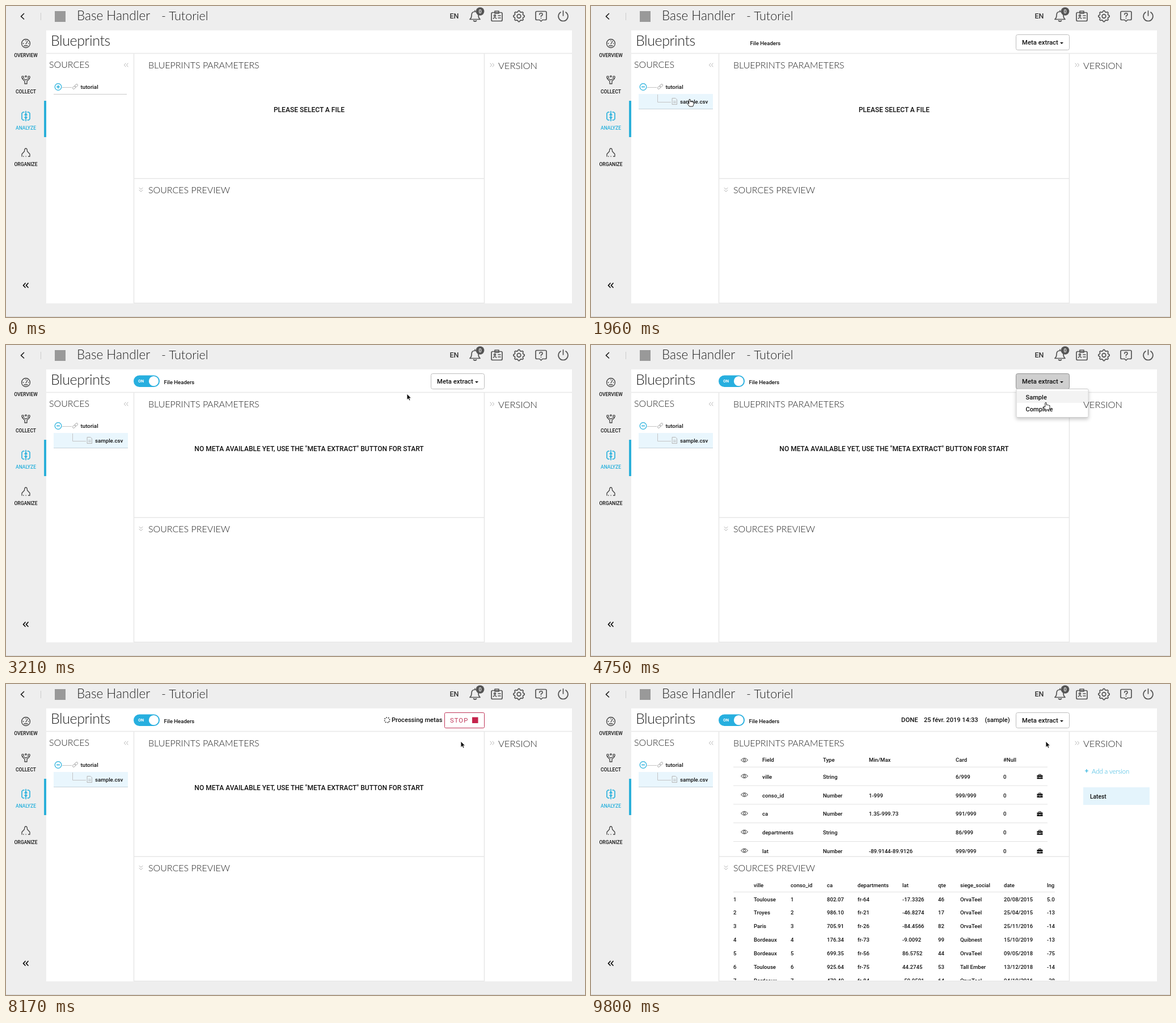
These frames come from a looping animation (1021x548 px, 9920 ms). An HTML page:

```html
<!DOCTYPE html>
<html lang="en">
<head>
<meta charset="utf-8">
<title>Blueprints</title>
<style>
html, body { margin: 0; width: 100%; height: 100%; overflow: hidden; background: #eee; }
svg { display: block; width: 1021px; height: 548px; }
text { font-family: Roboto, Arial, sans-serif; font-weight: 500; font-size: 9.6px; fill: #111; white-space: pre; }
.thin { font-family: Lato, "Open Sans", sans-serif; font-weight: 300; font-size: 16px; fill: #222; }
.line { fill: none; stroke: #555; stroke-width: 1.7; stroke-linecap: round; stroke-linejoin: round; }
.side { stroke: #444; stroke-width: 1.3; }
.soft { stroke: #b5b5b5; stroke-width: 1; }
.rule { stroke: #e2e2e2; }
.blue { stroke: #23afdc; }
</style>
</head>
<body>
<svg viewBox="0 0 1021 548">
  <defs>
    <clipPath id="paramClip"><rect x="227" y="85" width="615" height="218"/></clipPath>
    <clipPath id="previewClip"><rect x="227" y="305" width="591" height="217"/></clipPath>
    <filter id="shadow" x="-10%" y="-10%" width="120%" height="140%">
      <feDropShadow dx="0" dy="3" stdDeviation="3" flood-opacity=".22"/>
    </filter>
    <g id="eye" fill="none" stroke="#333">
      <path d="M-6 0Q0-7 6 0Q0 7-6 0Z"/><circle r="2"/>
    </g>
    <g id="case" fill="#111">
      <path d="M-5-2.5H5V.5H-5ZM-5 1.2H-1V2H1V1.2H5V4H-5Z"/>
      <path d="M-2-2.5V-4H2V-2.5" fill="none" stroke="#111"/>
    </g>
  </defs>
  <rect width="1021" height="548" fill="#eee"/>
  <path d="M0 547.5H1021" stroke="#d4d4d4"/>
  <rect x="71" y="43" width="927" height="481" fill="#fff"/>
  <path d="M71 83.5H998M225.5 84V524M843.5 84V524M226 304H843M226 523.5H843" fill="none" stroke="#e8e8e8" stroke-width="1.6"/>

  <!-- top bar -->
  <path class="line" d="M31.5 13.5L26.5 18.3L31.5 23" style="stroke:#222"/>
  <path d="M61.5 12V25" stroke="#ccc"/>
  <rect x="86" y="9" width="19" height="19" fill="#999"/>
  <g class="line">
    <path d="M818 23.5Q821 21 821 16Q821 10 827 10Q833 10 833 16Q833 21 836 23.5ZM827 10V8M824.5 26Q827 28 829.5 26"/>
    <rect x="856" y="11.5" width="19" height="15" rx="2"/>
    <path d="M862 11V9H869V13H862ZM868 17H872M868 21H872"/>
    <circle cx="862" cy="17" r="1.5"/><path d="M859.5 22Q862 18.5 864.5 22"/>
    <path id="gear"/><circle cx="904.5" cy="18" r="3.3"/>
    <path d="M936 9.5H951Q953 9.5 953 11.5V22.5Q953 24.5 951 24.5H946L943.5 27L941 24.5H936Q934 24.5 934 22.5V11.5Q934 9.5 936 9.5Z"/>
    <path d="M940.8 15Q941 12.5 943.5 12.5Q946 12.5 946 15Q946 16.5 943.5 17.8V18.5M943.5 21.3V21.4"/>
    <path d="M978 11A8.4 8.4 0 1 0 987 11M982.5 8.5V17"/>
  </g>
  <circle cx="836" cy="9.5" r="7.3" fill="#555"/>

  <!-- side bar -->
  <g class="line side">
    <circle cx="35" cy="66" r="7.5"/><path d="M35 67L38 62M30 66H31M35 61V61.5M39.5 66H40M32 70H38"/>
    <circle cx="29.5" cy="125.5" r="1.8"/><circle cx="35" cy="124" r="1.2"/><circle cx="40.5" cy="125.5" r="1.8"/>
    <path d="M28.5 128L33 132.5V137H37V132.5L41.5 128M32 128.5L35 130.5L38 128.5"/>
    <path d="M32.5 256Q32.5 251 35 251Q37.5 251 37.5 256L42 261V265H39.5M28 265V261L32.5 256M30.5 265H31M35 265H35.2"/>
  </g>
  <g class="line side blue" style="stroke-width:1.6">
    <path d="M32 187H30L28 189V199L30 201H32M38 187H40L42 189V199L40 201H38M35 185.5V202.5" stroke-dasharray="30"/>
    <path d="M33 192L35 190L37 192M33 196L35 198L37 196"/>
  </g>
  <rect x="67" y="167" width="4" height="64" fill="#2bb0da"/>
  <path class="line" d="M34 488.5L30.5 492.3L34 496M39 488.5L35.5 492.3L39 496" style="stroke:#111"/>
  <g class="line soft">
    <path d="M211 101L208.5 104L211 107M215 101L212.5 104L215 107M854 101L856.5 104L854 107M858 101L860.5 104L858 107M235 320.5L238 323L241 320.5M235 324.5L238 327L241 324.5"/>
  </g>

  <!-- source tree -->
  <path d="M99 143.5H116" stroke="#c4c4c4"/>
  <g class="line soft" transform="translate(122 142) rotate(-42)">
    <rect x="-5.5" y="-1.8" width="6" height="3.6" rx="1.8"/><rect x="-.5" y="-1.8" width="6" height="3.6" rx="1.8"/>
  </g>
  <circle cx="92" cy="142.5" r="5.8" fill="#fff" stroke="#23afdc" stroke-width="1.2"/>
  <path d="M89 142.5H95" stroke="#23afdc" stroke-width="1.5"/>
  <path id="closed" d="M92 139.5V145.5" stroke="#23afdc" stroke-width="1.5"/>
  <path id="closedRule" d="M84 155.5H213" stroke="#c9c9c9"/>
  <g id="branch">
    <rect id="rowTint" x="84" y="155" width="131" height="26" fill="#e9f6fd"/>
    <path d="M84 181.5H215" stroke="#c6d3da"/>
    <path d="M117.5 156V169.5H141" fill="none" stroke="#c4c4c4"/>
    <path class="line soft" d="M143.5 162.5H149L151.5 165V173.5H143.5ZM145.5 168H149.5M145.5 170.5H149.5"/>
  </g>

  <g id="toggle">
    <rect x="225" y="53.5" width="46" height="20.5" rx="10.2" fill="#27afdf"/>
    <circle cx="260.5" cy="63.7" r="8.6" fill="#fff"/>
  </g>
  <g id="metaButton">
    <rect id="metaBox" x="749.5" y="50.5" width="94" height="27" rx="3"/>
    <path d="M827 64H833L830 67Z" fill="#111"/>
  </g>
  <g id="menu">
    <rect x="750" y="77.5" width="127" height="50" rx="2" fill="#fff" stroke="#ccc" filter="url(#shadow)"/>
    <rect id="menuTint" x="751" y="81" width="125" height="21" fill="#f3f3f3"/>
  </g>
  <g id="busy">
    <circle id="spinner" cx="672" cy="63.5" r="4.5" fill="none" stroke="#333" stroke-width="1.7" stroke-dasharray="1.8 1.734"/>
    <rect x="773.5" y="50.5" width="70" height="27" rx="2" fill="#fff" stroke="#bf3558"/>
    <rect x="822" y="58.5" width="10.5" height="10.5" fill="#c5234b"/>
  </g>
  <g id="done">
    <rect x="868" y="182" width="117" height="31" fill="#e4f4fc"/>
    <path d="M871 153H877M874 150V156" stroke="#23afdc" stroke-width="1.2"/>
    <g id="params" clip-path="url(#paramClip)"></g>
    <g id="preview" clip-path="url(#previewClip)"></g>
  </g>
  <g id="base"></g>
  <g id="cursor">
    <path id="arrow" d="M0 0V10.6L2.5 8.4L4.1 12L6 11.2L4.4 7.7H7.6Z" fill="#111" stroke="#fff" stroke-width=".8"/>
    <path id="hand" d="M-1.2 1Q0-.6 1.2 1V5L2.2 4.2L3.4 5L4.6 4.6L5.6 5.6L7 5.5V9.5L5.6 13H-.4L-4 8.2Q-3.6 6.6-2 7.6L-1.2 8.2Z" fill="#fff" stroke="#222" stroke-linejoin="round"/>
  </g>
</svg>
<script>
const LOOP = 9920;
const NS = "http://www.w3.org/2000/svg";
const $ = id => document.getElementById(id);

function add(parent, tag, attrs) {
  const el = document.createElementNS(NS, tag);
  for (const key in attrs) el.setAttribute(key, attrs[key]);
  return $(parent).appendChild(el);
}
function label(parent, x, y, text, style = "", cls = "") {
  const el = add(parent, "text", { x, y, style, class: cls });
  el.textContent = text;
  return el;
}
const size = px => `font-size:${px}px`;
const middle = px => size(px) + ";text-anchor:middle";

// gear outline: eight rounded teeth
let gear = "";
for (let i = 0; i < 32; i++) {
  const r = i % 4 < 2 ? 9.7 : 7.8, a = (i - .5) * Math.PI / 16;
  gear += `${i ? "L" : "M"}${904.5 + r * Math.cos(a)} ${18 + r * Math.sin(a)}`;
}
$("gear").setAttribute("d", gear + "Z");

// fixed labels
label("base", 125, 25, "Base Handler", size(22.5), "thin");
label("base", 274, 25, "- Tutoriel", size(21.5), "thin");
label("base", 79, 70, "Blueprints", size(25) + ";letter-spacing:-.4px", "thin");
label("base", 76, 109, "SOURCES", "", "thin");
label("base", 251, 109.5, "BLUEPRINTS PARAMETERS", "", "thin");
label("base", 251, 330, "SOURCES PREVIEW", "", "thin");
label("base", 868, 110.5, "VERSION", size(16.5), "thin");
label("base", 782.5, 22, "EN", size(12.5) + ";fill:#333");
label("base", 836, 13, "0", middle(9) + ";fill:#fff");
["OVERVIEW", "COLLECT", "ANALYZE", "ORGANIZE"].forEach((name, i) =>
  label("base", 35, 90 + 64 * i, name, middle(8.5) + (i === 2 ? ";fill:#23afdc" : "")));
label("base", 131.5, 146, "tutorial", size(9.8));

label("branch", 157, 171.5, "sample.csv", size(9.7));
label("toggle", 233, 66.3, "ON", size(7.3) + ";fill:#fff;font-weight:700");
label("metaButton", 760, 68, "Meta extract", size(11.3));
label("menu", 766.5, 95.5, "Sample", size(11.1));
label("menu", 766.5, 116.5, "Complete", size(11.1));
label("busy", 680, 67, "Processing metas", size(11.1));
label("busy", 783, 68, "STOP", size(11.2) + ";font-weight:400;letter-spacing:1.1px;fill:#bf3558");
const headers = label("base", 278, 68.5, "File Headers");
const pick = label("base", 534.5, 187, "PLEASE SELECT A FILE", middle(12));
const noMeta = label("base", 534.5, 187, 'NO META AVAILABLE YET, USE THE "META EXTRACT" BUTTON FOR START', middle(12));

// results
label("done", 547, 67, "DONE", size(11.3));
label("done", 587, 67, "25 févr. 2019 14:33", size(11.1));
label("done", 694.5, 67, "(sample)", size(11.1));
label("done", 883, 158, "Add a version", size(11.3) + ";fill:#23afdc", "thin");
label("done", 880, 201.5, "Latest", size(10.2));

function row(parent, xs, y, cells) {
  cells.split("|").forEach((cell, i) => label(parent, xs[i], y, cell));
}
const paramX = [302, 409, 490, 643, 727];
row("params", paramX, 137, "Field|Type|Min/Max|Card|#Null");
add("params", "use", { href: "#eye", x: 270.5, y: 134 });
[
  "ville|String||6/999|0",
  "conso_id|Number|1-999|999/999|0",
  "ca|Number|1.35-999.73|991/999|0",
  "departments|String||86/999|0",
  "lat|Number|-89.9144-89.9126|999/999|0"
].forEach((cells, i) => {
  const y = 163.3 + 32.8 * i;
  add("params", "path", { d: `M251 ${y - 17}H805`, class: "rule" });
  add("params", "use", { href: "#eye", x: 270.5, y: y - 1 });
  add("params", "use", { href: "#case", x: 791.5, y });
  row("params", paramX, y + 3.5, cells);
});

const previewX = [251, 287, 352, 416, 470, 549, 612, 651, 728, 804];
row("preview", previewX, 358, "|ville|conso_id|ca|departments|lat|qte|siege_social|date|lng");
add("preview", "path", { d: "M251 366.5H818", class: "rule" });
[
  "Toulouse|1|802.07|fr-64|-17.3326|46|OrvaTeel|20/08/2015|5.0",
  "Troyes|2|986.10|fr-21|-46.8274|17|OrvaTeel|25/04/2015|-13",
  "Paris|3|705.91|fr-26|-84.4566|82|OrvaTeel|25/11/2016|-14",
  "Bordeaux|4|176.34|fr-73|-9.0092|99|Quibnest|15/10/2019|-13",
  "Bordeaux|5|699.35|fr-56|86.5752|44|OrvaTeel|09/05/2018|-75",
  "Toulouse|6|925.64|fr-75|44.2745|53|Tall Ember|13/12/2018|-14",
  "Bordeaux|7|470.40|fr-84|-50.0501|64|OrvaTeel|04/10/2016|-38"
].forEach((cells, i) => row("preview", previewX, 382.5 + 23.85 * i, `${i + 1}|${cells}`));

// pointer path: time, x, y
const path = [
  [60, 262, 318], [700, 92, 141], [1050, 92, 141], [1500, 174, 164], [2150, 174, 164],
  [3000, 707, 86], [3260, 707, 86], [3560, 796, 66], [3850, 796, 66],
  [4300, 802, 101], [LOOP, 802, 101]
];
function pointer(t) {
  const i = Math.max(1, path.findIndex(p => p[0] > t));
  const [t0, x0, y0] = path[i - 1], [t1, x1, y1] = path[i];
  const k = Math.min(1, Math.max(0, (t - t0) / (t1 - t0)));
  const e = k * k * (3 - 2 * k);
  return [x0 + (x1 - x0) * e, y0 + (y1 - y0) * e];
}

const OPEN = 960, SELECT = 1800, TOGGLE = 2000, LOADED = 2150;
const MENU = 3720, START = 4980, FINISH = 8680;
const show = (el, on) => { el.style.display = on ? "" : "none"; };

function draw(t) {
  const [x, y] = pointer(t);
  const during = (a, b = LOOP) => t >= a && t < b;
  const onRow = x > 84 && x < 215 && y > 155 && y < 181;
  const onButton = x > 749 && x < 844 && y > 50 && y < 78;
  const menuOpen = during(MENU, START);

  show($("closed"), t < OPEN);
  show($("closedRule"), t < OPEN);
  show($("branch"), t >= OPEN);
  show($("rowTint"), t >= SELECT || onRow);
  show(headers, t >= SELECT);
  headers.setAttribute("x", t < TOGGLE ? 280.5 : 278.5);
  show($("toggle"), t >= TOGGLE);
  $("toggle").style.opacity = Math.min(1, (t - TOGGLE) / 120);
  show(pick, t < LOADED);
  show(noMeta, during(LOADED, FINISH));

  show($("metaButton"), during(SELECT, START) || t >= FINISH);
  const dark = menuOpen || (onButton && t < START);
  $("metaBox").setAttribute("fill", menuOpen ? "#cfcfcf" : dark ? "#e6e6e6" : "#fff");
  $("metaBox").setAttribute("stroke", dark ? "#909090" : "#bcbcbc");
  show($("menu"), menuOpen);
  show($("menuTint"), y > 80);
  show($("busy"), during(START, FINISH));
  $("spinner").setAttribute("transform", `rotate(${Math.floor(t / 125) * 45 + t % 125 * .36} 672 63.5)`);
  show($("done"), t >= FINISH);

  const pointing = during(650, 1100) || (onRow && t < 2400) || (onButton && t < START) || (menuOpen && y > 78);
  show($("cursor"), t >= 60);
  show($("hand"), pointing);
  show($("arrow"), !pointing);
  $("cursor").setAttribute("transform", `translate(${x} ${y})`);
}

const began = performance.now();
function tick() {
  draw((performance.now() - began) % LOOP);
  requestAnimationFrame(tick);
}
tick();
</script>
</body>
</html>
```
